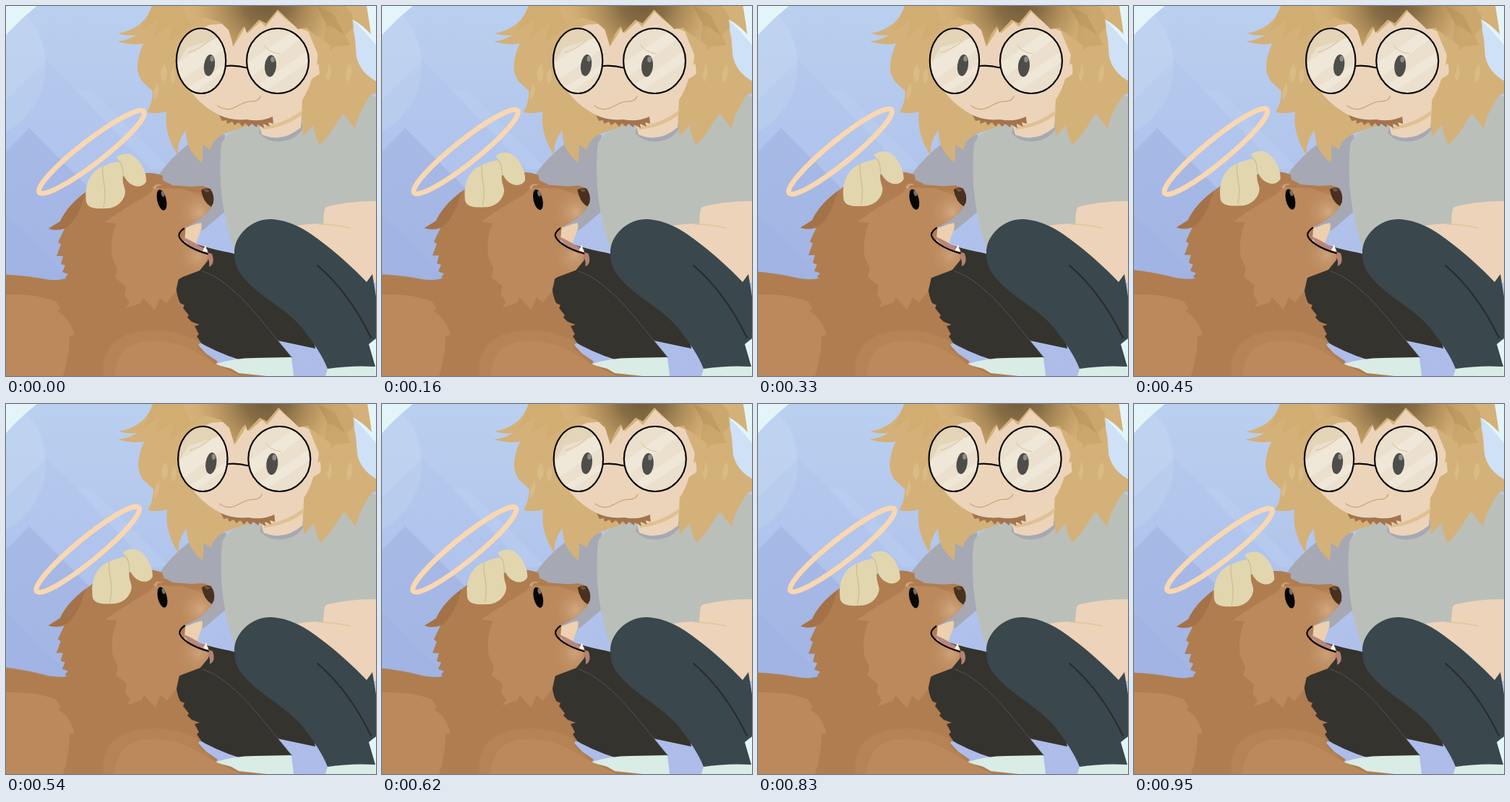
These frames come from a looping animation (512x512 px, 1 s). An HTML page:

```html
<!DOCTYPE html>
<html lang="en">
<head>
<meta charset="utf-8">
<title>Petting a good dog</title>
<style>
@property --p { syntax: '<number>'; inherits: true; initial-value: 0; }
html, body { margin: 0; width: 100%; height: 100%; overflow: hidden; background: #e4f5fa; }
svg { display: block; width: 100vw; height: 100vh; animation: pet 1s infinite; }
/* quick stroke up, steady stroke back */
@keyframes pet {
  0% { --p: 0; animation-timing-function: cubic-bezier(.39, .575, .565, 1); }
  54% { --p: 1; animation-timing-function: linear; }
  95.8%, 100% { --p: 0; }
}
/* the back rises a little later and settles sooner */
@keyframes breathe {
  0%, 8% { transform: none; animation-timing-function: ease-in-out; }
  54% { transform: skewY(4.3deg); animation-timing-function: ease-in-out; }
  86%, 100% { transform: none; }
}
.hand { transform: translate(calc(var(--p) * 8.8px), calc(var(--p) * -3.8px)); }
.halo { transform: translate(calc(var(--p) * -5.3px), calc(var(--p) * -.7px)) rotate(calc(var(--p) * -1.7deg)); transform-origin: 118px 202px; }
.hair { transform: translateX(calc(var(--p) * 1.1px)); }
.face { transform: translateX(calc(var(--p) * 2.3px)); }
.torso { transform: translateX(calc(var(--p) * 1.2px)); }
.back { animation: breathe 1s infinite; transform-origin: 94px 378px; }
.snout { transform: translate(calc(var(--p) * .9px), calc(var(--p) * -1px)); }
.crown { transform: translate(calc(var(--p) * -.3px), calc(var(--p) * -1.6px)); }
.line { fill: none; stroke-linecap: round; }
</style>
</head>
<body>
<svg viewBox="0 0 512 512" preserveAspectRatio="none">
<defs>
  <linearGradient id="sky" x1="0" y1="0" x2="0" y2="512" gradientUnits="userSpaceOnUse">
    <stop offset="0" stop-color="#bad0ef"/><stop offset=".45" stop-color="#b1c4ec"/><stop offset="1" stop-color="#adbce8"/>
  </linearGradient>
  <linearGradient id="band" x1="30" y1="170" x2="120" y2="370" gradientUnits="userSpaceOnUse">
    <stop offset="0" stop-color="#a7b9e5"/><stop offset="1" stop-color="#a3b5e4"/>
  </linearGradient>
  <radialGradient id="roots" cx="360" cy="-8" r="112" gradientUnits="userSpaceOnUse">
    <stop offset="0" stop-color="#6d593b"/><stop offset=".3" stop-color="#806640" stop-opacity=".9"/>
    <stop offset=".65" stop-color="#a9854f" stop-opacity=".5"/><stop offset="1" stop-color="#d4b078" stop-opacity="0"/>
  </radialGradient>
  <radialGradient id="muzzle" cx="268" cy="286" r="36" gradientUnits="userSpaceOnUse">
    <stop offset="0" stop-color="#d2a882"/><stop offset="1" stop-color="#bb895b" stop-opacity="0"/>
  </radialGradient>
  <radialGradient id="chin" cx="266" cy="346" r="34" gradientUnits="userSpaceOnUse">
    <stop offset="0" stop-color="#cda17b"/><stop offset="1" stop-color="#bb895b" stop-opacity="0"/>
  </radialGradient>
  <clipPath id="disc"><circle cx="250" cy="262" r="334"/></clipPath>
  <clipPath id="lenses"><ellipse cx="270" cy="76" rx="34" ry="45"/><ellipse cx="376" cy="76" rx="43" ry="45"/></clipPath>
</defs>

<rect width="512" height="512" fill="#e4f5fa"/>
<g clip-path="url(#disc)">
  <rect width="512" height="512" fill="url(#sky)"/>
  <circle cx="-50" cy="82" r="105" fill="#c4d8f2" opacity=".6"/>
  <path d="M0 130 56 75 250 270V400H200L0 205Z" fill="#adc1ea" opacity=".3"/>
  <path d="M0 202 32 169 230 367V420H0Z" fill="url(#band)"/>
  <path d="M0 288 90 378H0Z" fill="#99acdf" opacity=".25"/>
  <path d="M95 115 120 118 226 224 200 226Z" fill="#bccff1" opacity=".4"/>
  <path d="M470 0H512V122L480 70Z" fill="#cfe1f6"/>
</g>
<path d="M512 455 498 470V512H512Z" fill="#e4f5fa"/>

<g class="halo">
  <ellipse cx="118.500" cy="202" rx="91.500" ry="16" transform="rotate(-37.700 118.500 202)" fill="none" stroke="#f9d7b1" stroke-width="7"/>
</g>

<!-- far arm and torso -->
<g class="torso">
  <path d="M303 178C285 180 268 181 258 187Q230 207 211 234L240 290 258 316 274 309 306 282Z" fill="#a6a8b3"/>
  <path d="M238 316Q252 303 270 300C273 308 266 317 264 327L258 329 240 322Z" fill="#ecd0af"/>
  <path d="M298 192C302 176 328 164 352 162L412 150C448 130 480 120 498 121L512 126V290L440 320 320 346C303 306 292 250 298 192Z" fill="#bbbfb9"/>
  <path d="M350 176Q362 190 383 187 402 185 412 168L408 160 352 168Z" fill="#a6a8b3"/>
</g>

<!-- legs -->
<path d="M265 330C285 337 306 340 320 344L420 430 428 474 376 463 396 487Q348 492 322 489 290 479 262 462L228 410 236 372Z" fill="#35332e"/>
<path class="line" d="M272 367C315 381 352 434 395 486" stroke="#4c5558" stroke-width="1"/>
<path d="M403 304Q422 300 439 302C440 292 439 282 443 278Q474 270 512 270V383H498Q455 340 403 304Z" fill="#ecd3b9"/>
<path class="line" d="M433 302Q452 302 476 307" stroke="#e2c698" stroke-width="1.300"/>
<path d="M316 342C315 320 337 295 366 295 392 296 415 309 435 325 458 342 480 362 499 382L507 371 512 402V460L502 468 511 499Q480 502 445 502C438 484 427 468 411 447 390 419 338 396 321 365Q316 355 316 342Z" fill="#3a474c"/>
<path class="line" d="M431 359C465 388 488 424 505 459" stroke="#2b2a26" stroke-width="2"/>
<path d="M288 496Q315 487 345 487L395 486 398 512H295ZM442 512 445 502Q478 497 510 499L512 512Z" fill="#d9ece5"/>

<!-- head -->
<g class="hair">
  <path d="M202 0Q192 31 155 38 168 42 180 40 170 47 154 49 174 55 190 52 181 72 182 88 184 98 188 104L203 118Q203 134 195 147 208 150 222 146 218 177 238 207 236 187 249 172 248 198 271 217 273 203 272 192L283 199Q286 184 302 177L408 139 411 181 425 165Q428 182 434 192 448 180 460 158L467 149 483 170Q486 153 495 139 505 118 512 122V104Q490 92 485 70L483 45 478 18Q492 25 505 39 502 17 499 0Z" fill="#d4b179"/>
  <path d="M404 0 425 30 440 68 455 56 476 54 470 40 481 30 479 12 470 0Z" fill="#c7a367" opacity=".7"/>
  <path d="M395 0 418 23 452 29 468 40 454 12 430 0Z" fill="#b9935a" opacity=".6"/>
  <path d="M202 0 188 34 211 18 205 42 231 24 226 50 263 23 281 0Z" fill="#d0aa6d" opacity=".6"/>
  <path d="M220 80Q210 92 217 105 227 100 220 80M232 86Q224 96 230 108 238 98 232 86M210 106Q202 118 205 130 214 121 210 106M445 77Q439 91 446 105 454 90 445 77M476 80Q467 92 472 106 482 95 476 80" fill="#dabb85"/>
</g>
<g class="face">
  <path d="M347 150 354 178Q382 190 408 168L410 130Z" fill="#ecd4ba"/>
  <path d="M354 167Q386 163 411 143L409 151Q386 168 355 171Z" fill="#e0c193"/>
  <path d="M237 82Q240 42 282 26L308 24 314 56Q327 38 332 27L334 38 352 22 359 29 376 8Q395 28 420 36L430 56 434 94 423 101Q413 136 388 150 368 162 340 161 312 161 288 147 252 126 237 82Z" fill="#ecd4ba"/>
  <path class="line" d="M293 138Q305 147 319 139 333 131 342 132 350 131 352 125" stroke="#cda67c" stroke-width="1.400"/>
  <path d="M295 151Q312 159 333 157 352 161 369 153L370 163 363 161 365 167 356 163 357 169 348 164 347 168 340 163 336 167 331 162 327 167 322 161 316 165 313 160 306 163 305 158 299 159Z" fill="#a3744c"/>
  <g clip-path="url(#lenses)">
    <rect x="234" y="28" width="190" height="96" fill="#ece1d0" opacity=".9"/>
    <path d="M235 84 250 58 300 42V28H235ZM410 35 425 65 420 95 414 60Z" fill="#dfcca8" opacity=".55"/>
    <path d="M236 79 299 39 305 58 242 103ZM252 112 306 79V88L260 119ZM334 79 398 34 410 43 340 98ZM349 109 419 61V77L361 116Z" fill="#f7f2e9" opacity=".35"/>
    <path class="line" d="M252 64Q266 61 281 48M357 54Q362 63 378 66" stroke="#dcc39d" stroke-width="1.300" opacity=".8"/>
  </g>
  <g fill="#4d4d4a">
    <ellipse cx="281.500" cy="82" rx="7.500" ry="15" transform="rotate(8 281.500 82)"/>
    <ellipse cx="366" cy="83" rx="8" ry="15" transform="rotate(5 366 83)"/>
  </g>
  <g fill="#8d8c88">
    <ellipse cx="285" cy="73" rx="2.600" ry="4"/><ellipse cx="369" cy="74" rx="2.800" ry="4"/>
  </g>
  <g fill="none" stroke="#080808" stroke-width="2.200">
    <ellipse cx="270" cy="76" rx="34.200" ry="45"/>
    <ellipse cx="376" cy="76" rx="43" ry="45"/>
    <path d="M304 83Q318 81.500 333 85.500"/>
  </g>
</g>
<g class="hair">
  <path id="fringe" d="M243 0 254 25 275 16 296 22 308 33 315 56Q321 36 330 28L333 37 350 19 360 24 376 5 404 32 417 30 429 58 426 35 439 59 443 24 430 0Z" fill="#d4b179"/>
  <path d="M243 0 254 25 275 16 296 22 308 33 315 56Q321 36 330 28L333 37 350 19 360 24 376 5 404 32 417 30 429 58 440 68 470 40 478 18 472 0Z" fill="url(#roots)"/>
  <path d="M417 32 432 68 430 82 437 76 433 100 445 92 449 55Z" fill="#d4b179"/>
</g>

<!-- dog -->
<path class="back" d="M-4 371.500Q30 373 57 378.500 72 380.500 98 377V430H-4Z" fill="#af7d50"/>
<path d="M0 392 84 377 100 350 238 376 235 386Q236 401 241 411L247 414 245 418 253 428 251 431 257 437 268 441 261 443 267 454 264 457 270 466 265 468 277 481 293 492 290 496 312 502 322 508 360 512H0Z" fill="#af7d50"/>
<g class="crown">
  <path d="M111 257Q85 276 75 298L59 308Q70 312 81 308L72 327 76 330 70 346 79 346 76 357 82 359 78 368 86 371 82 376 90 382 155 426 243 376 250 290 229 247 216 241 217 235Q203 229 188 232L134 240Z" fill="#af7d50"/>
  <path d="M111 257Q85 276 75 298L59 308Q72 312 85 306 101 291 108 265Z" fill="#a47248"/>
</g>
<g class="snout">
  <path d="M170 268 200 239 216 236 218 244 229 248 256 250 272 249 284 253 287 273Q276 293 258 301 243 309 239 317 242 328 279 343 279 353 268 365 240 377 210 380Z" fill="#af7d50"/>
  <path d="M197 261Q171 275 137 299L153 301Q143 323 147 349L154 364 151 376 166 388 164 400 171 410 166 418 187 411 190 404 206 421 213 404 222 411 235 395 239 377 268 366 279 352V343Q242 328 239 317 242 309 265 296L286 275 281 267 245 253 205 252Z" fill="#bb895b"/>
  <path d="M286 275Q275 294 257 302L231 315 226 280 250 255 275 258Z" fill="url(#muzzle)"/>
  <path d="M238 316Q242 330 279 343V353L268 366 239 377 226 342Z" fill="url(#chin)"/>
  <path d="M243 319Q256 324 266 331L279 337 280 343Q255 338 243 319Z" fill="#b8877a"/>
  <path d="M279 341 285 343Q290 357 281 361 282 352 279 350Z" fill="#b48271"/>
  <path d="M272 339 276 331 279 341Z" fill="#faf4e5"/>
  <path class="line" d="M246 308Q238 314 239.500 319C242 326 254 336 279 343" stroke="#080605" stroke-width="2.200"/>
  <path d="M270 255Q274 251 282 253 289 260 287 272L284 278Q273 272 270 255Z" fill="#49301f"/>
  <path d="M273 254Q278 252 282 256L277 258Z" fill="#735440"/>
  <ellipse cx="215.500" cy="268.500" rx="6.300" ry="14.500" transform="rotate(-13 215.500 268.500)" fill="#070605"/>
  <ellipse cx="217" cy="260" rx="2.200" ry="4" transform="rotate(-15 217 260)" fill="#77736e"/>
  <path d="M203 252Q207 244 216 248L209 249 207 254Z" fill="#cca078"/>
</g>
<path d="M0 399Q44 398 69 409L76 420 71 422Q88 431 95 455L88 457Q88 484 79 512H0Z" fill="#bb895b"/>
<path d="M135 512Q130 471 166 455 210 440 262 461L267 467 265 474 286 491 230 512Z" fill="#b58356"/>
<path d="M150 512Q153 473 185 465 228 459 260 478 288 495 325 512Z" fill="#bb895b"/>

<g class="hand">
  <path d="M111 271C108 248 116 229 134 222Q147 216 157 215L153 209Q163 202 174 206C187 213 195 231 194 243 190 250 182 251 176 248 168 245 164 237 162 232 160 247 165 250 165 258 163 272 151 280 139 280 125 281 113 280 111 271Z" fill="#e2d6af"/>
  <path class="line" d="M134 223C132 241 141 253 135 278M157 215Q162 221 162 233" stroke="#cfbd8d" stroke-width="1.300"/>
</g>
</svg>
</body>
</html>
```
